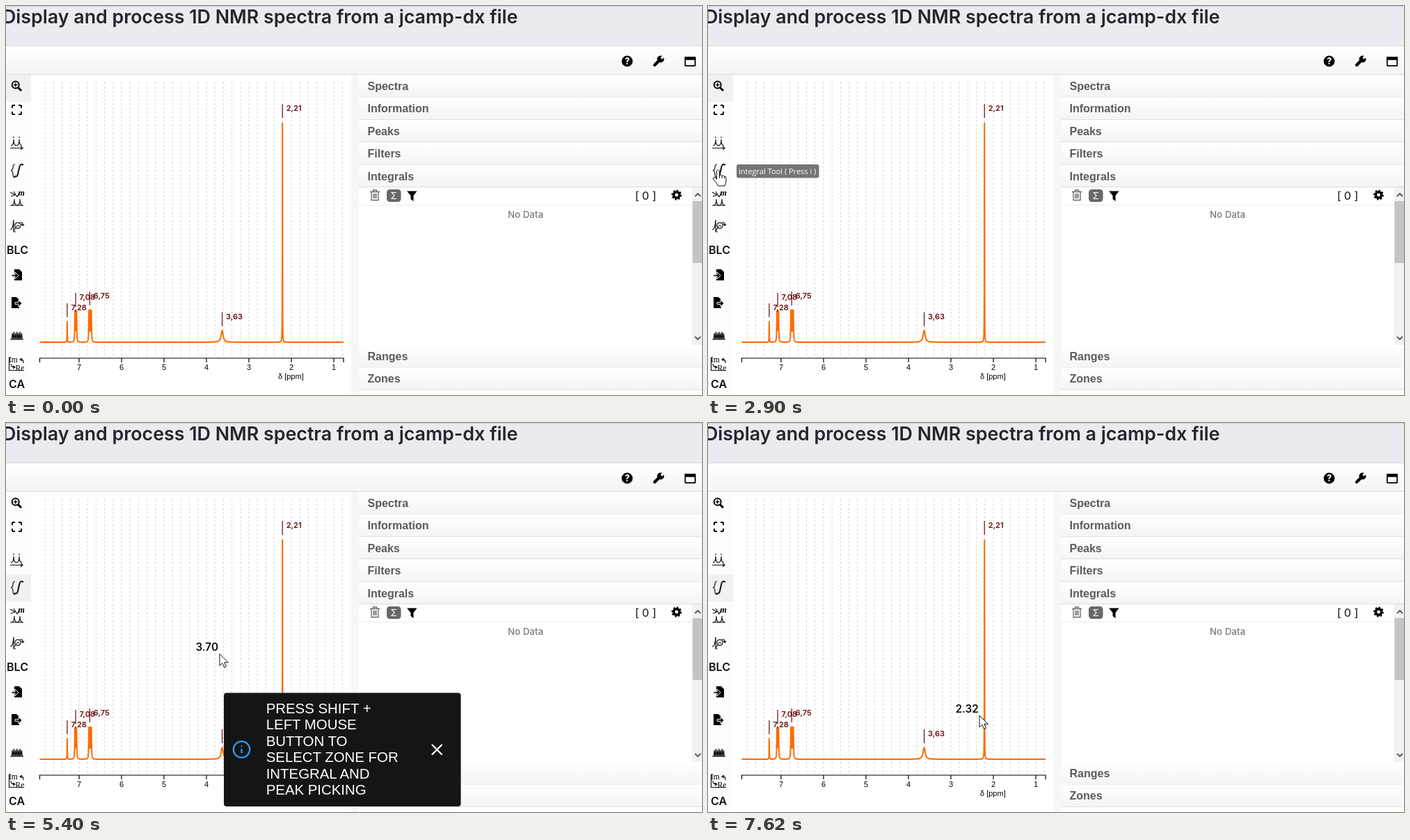
Recreate the animation shown at these times as an HTML page. Size 1000 px wide and 560 px high, loop 8 s.

```html
<!DOCTYPE html>
<html lang="en">
<head>
<meta charset="utf-8">
<title>NMR spectrum viewer</title>
<style>
  html, body { margin: 0; width: 100%; height: 100%; overflow: hidden; background: #fff; }
  svg { display: block; }
  text { font-family: Inter, sans-serif; }
  .arial, .arial text { font-family: "Liberation Sans", Arial, sans-serif; }
  .serif, .serif text { font-family: "Liberation Serif", serif; }
  .line { fill: none; stroke: #111; stroke-width: 1.2; }
  .mid { text-anchor: middle; }
</style>
</head>
<body>
<svg width="1000" height="560" xmlns="http://www.w3.org/2000/svg">
  <defs>
    <linearGradient id="bar" x2="0" y2="1">
      <stop stop-color="#fff"/><stop offset="1" stop-color="#f4f4f4"/>
    </linearGradient>
    <clipPath id="plotClip"><rect x="37" y="99" width="459" height="452"/></clipPath>
    <path id="bumps" d="M0 10q4 0 4-9q0 9 4 9t4-9q0 9 4 9"/>
    <path id="file" d="M0 0H7L11 4V16H0Z"/>
    <path id="into" d="M0-1.300H5V-5L10 0L5 5V1.300H0Z"/>
  </defs>

  <!-- page head -->
  <rect width="1000" height="58" fill="#eaebf0"/>
  <path d="M0 .5H1000" stroke="#d2d3d7"/>
  <text x="-5" y="25" font-size="26.8" font-weight="600" fill="#25252d">Display and process 1D NMR spectra from a jcamp-dx file</text>
  <rect y="58" width="1000" height="41" fill="url(#bar)"/>
  <path d="M0 57.5H1000M0 98.5H1000" stroke="#dcdcdc"/>
  <circle cx="892.5" cy="79.5" r="7.9"/>
  <text class="mid" x="892.5" y="84" font-size="12.5" font-weight="800" fill="#fff">?</text>
  <path d="M932 85L940 77" stroke="#000" stroke-width="4.4" stroke-linecap="round"/>
  <circle cx="940.5" cy="76.5" r="5"/>
  <path d="M941.5 75.5L946 71" stroke="#fbfbfb" stroke-width="3.6"/>
  <rect x="975.8" y="73.8" width="14.4" height="12.4" rx="1" fill="none" stroke="#000" stroke-width="1.7"/>
  <rect x="975" y="73" width="16" height="4.800" rx="1"/>

  <!-- tool column -->
  <rect y="99" width="36.5" height="461" fill="#fdfdfd"/>
  <rect id="active" width="36" height="39" fill="#f1f1f1"/>
  <g fill="none" stroke="#000" stroke-width="2">
    <circle cx="13.7" cy="113.5" r="5"/>
    <path d="M17.5 117.5L22 122" stroke-width="3"/>
    <path d="M11 113.5h5.4M13.7 110.8v5.4" stroke-width="1.4"/>
    <rect x="9" y="143" width="13" height="13" stroke-dasharray="4 5 4 0"/>
  </g>
  <g class="line">
    <use href="#bumps" x="7" y="191"/>
    <path d="M6 204.500H24M21 202l3 2.500-3 2.500M11 188v2M19 188v2"/>
    <path d="M13 228q-3 0-3 4t-3 5q3 0 3 5t3 5"/>
    <path d="M25 229q-5-3-6 4l-2 9q-1 5-5 3" stroke-width="2"/>
    <path d="M6 268l7 4M7 274l6-2M11 267l5 8M16 275l3-6M6 287H25"/>
    <use href="#bumps" x="8" y="277"/>
    <path d="M6 322q4 0 5-14v17h3"/>
    <circle cx="17" cy="316" r="4.200"/>
    <path d="M15 318q2-5 4 0M14 319l-3 5M20 312q4-2 4 4l-2-2m2 2l2-2"/>
    <path d="M20 509q5-2 5 5M23 507l-3 2 3 2M7 515q0 5 5 5M10 518l3 2-3 2M4.500 506v18.500H26"/>
  </g>
  <text class="serif" x="17.500" y="273" font-size="12" font-weight="700" font-style="italic">m</text>
  <g font-size="16" font-weight="600" fill="#111">
    <text x="1" y="357">BLC</text><text x="4" y="549.500">CA</text>
  </g>
  <use href="#file" x="12" y="379"/><use href="#into" x="8" y="388" stroke="#fdfdfd" stroke-width="1"/>
  <use href="#file" x="8" y="419"/><use href="#into" x="13" y="428" stroke="#fdfdfd" stroke-width="1"/>
  <path id="spikes" class="line"/>
  <g class="serif" font-size="11.500"><text x="4" y="513">Im</text><text x="13.500" y="525">Re</text></g>

  <!-- chart -->
  <rect x="37" y="99" width="459" height="452" fill="#fff"/>
  <rect x="496" y="99" width="11" height="461" fill="#f7f7f7"/>
  <path id="grid" stroke="#d6d6d6" stroke-dasharray="3 3"/>
  <path id="curve" fill="none" stroke="#ff6a00" stroke-width="2" stroke-linejoin="round"/>
  <path id="axis" fill="none" stroke="#000" stroke-width="1.200"/>
  <g id="ticks" class="arial mid" font-size="11"></g>
  <text class="arial" x="391" y="537" font-size="11">δ [ppm]</text>
  <g id="peaks" font-size="11" font-weight="600" fill="#650b0b"></g>

  <!-- side panel -->
  <g id="panel" class="arial" font-size="16" font-weight="700" fill="#5b5b5b"></g>
  <rect x="507" y="261" width="493" height="227" fill="#fff"/>
  <path d="M507 286.500H986" stroke="#ececec"/>
  <path d="M523 267.500h14M527.500 267v-2h5v2M525 268v11.500h10V268M528 270v7M530 270v7M532 270v7" fill="none" stroke="#666" stroke-width="1.300"/>
  <rect x="547" y="264" width="20.500" height="18" rx="4.500" fill="#686868"/>
  <text class="mid" x="557.200" y="278" font-size="13.500" fill="#fff">Σ</text>
  <path d="M576 266.500h14.500l-5 6.500v8l-4-3v-5z"/>
  <text class="mid" x="919" y="279" font-size="16" font-weight="500" fill="#333">[ 0 ]</text>
  <g fill="none" stroke="#000">
    <circle cx="963.500" cy="272" r="4.200" stroke-width="3.600"/>
    <circle cx="963.500" cy="272" r="6" stroke-width="2.800" pathLength="16" stroke-dasharray="1"/>
  </g>
  <text class="mid" x="746.500" y="305" font-size="13.300" font-weight="500" fill="#7b7b7b">No Data</text>
  <rect x="986" y="261" width="14" height="227" fill="#f1f1f1"/>
  <rect x="986.500" y="281" width="13.500" height="89" fill="#c4c4c4"/>
  <path d="M990 274l4-4 4 4M990 476l4 4 4-4" fill="none" stroke="#555" stroke-width="1.800"/>

  <!-- overlays -->
  <g id="probe" clip-path="url(#plotClip)">
    <path id="cross" stroke="#111"/>
    <text id="value" font-size="15.300" font-weight="600" fill="#111" text-anchor="end"></text>
  </g>
  <g id="tip">
    <rect x="41" y="228" width="118.500" height="19.500" rx="3" fill="#757575"/>
    <text x="44" y="241.500" font-size="11" fill="#fff" style="font-family:'Open Sans',sans-serif">integral Tool ( Press i )</text>
  </g>
  <g id="toast">
    <rect x="313" y="388.500" width="340.500" height="163.500" rx="4" fill="#151515"/>
    <g id="message" class="arial" font-size="20.400" fill="#fff"></g>
    <g fill="none" stroke="#2e9bf5" stroke-width="2.300" stroke-linecap="round">
      <circle cx="338.500" cy="470" r="11.700"/><path d="M338.500 470v4.700M338.500 465.300v.01"/>
    </g>
    <path d="M612.500 463.500l13.500 13.500M626 463.500l-13.500 13.500" stroke="#fff" stroke-width="2.300" stroke-linecap="round"/>
    <rect id="focus" x="596.500" y="456.500" width="46" height="28" fill="none" stroke="#a5a5a5"/>
  </g>
  <circle id="click" r="13.700" fill="#fe0" fill-opacity=".62"/>
  <g id="mouse" fill="#fff" stroke="#111" stroke-linejoin="round">
    <path id="arrow" d="M0 0V17L4 13.300 6.800 19.500 9.500 18.300 6.800 12.300H12.300Z"/>
    <g id="hand">
      <path d="M-2 1.500Q0-2 2 1.500V8Q4.500 6 5.500 8.500Q8 7 9 9.500Q11.500 9 11.500 11.500V16Q11.500 18 9.500 23H0Q-2 19-7 13Q-7 9-4 11.500L-2 13.500Z"/>
      <path d="M2 8v4M5.500 8.500V12M9 9.500V12.500" fill="none"/>
    </g>
  </g>
</svg>
<script>
const LOOP = 8000, LAG = 0.42;
const $ = id => document.getElementById(id);
const show = (id, on) => { $(id).style.display = on ? '' : 'none'; };
const clamp = v => Math.max(0, Math.min(1, v));
const mix = (a, b, f) => a + (b - a) * f;
const ppmX = ppm => 105 + (7 - ppm) * 61;
const xPpm = x => 7 - (x - 105) / 61;

const linear = f => f;
const easeIn = f => f * f;
const easeOut = f => 1 - (1 - f) ** 3;
const easeInOut = f => f < 0.5 ? 4 * f ** 3 : 1 - 4 * (1 - f) ** 3;

function set(el, attrs) {
  for (const k in attrs) el.setAttribute(k, attrs[k]);
  return el;
}

function add(parent, tag, attrs, text = '') {
  const el = set(document.createElementNS('http://www.w3.org/2000/svg', tag), attrs);
  el.textContent = text;
  $(parent).appendChild(el);
}

const signals = [
  { label: '7,28', top: 454, lines: 1, width: 0.2 },
  { label: '7,08', top: 439, lines: 3, width: 0.4 },
  { label: '6,75', top: 437, lines: 4, width: 0.4 },
  { label: '3,63', top: 467, lines: 1, width: 1.7 },
  { label: '2,21', top: 167, lines: 1, width: 0.15 }
];

function drawChart() {
  let grid = '', axis = 'M48.5 513V507H485V513', spikes = 'M6 480H25';
  for (let i = 0; i <= 35; i++) grid += `M${ppmX(7.8 - i * 0.2)} 110V506`;
  for (let p = 1; p <= 7; p++) {
    axis += `M${ppmX(p)} 507v6`;
    add('ticks', 'text', { x: ppmX(p), y: 524 }, p);
    spikes += `M${6 + p * 2.2} 480l1-${p % 2 ? 9 : 11}l1 ${p % 2 ? 9 : 11}`;
  }
  set($('grid'), { d: grid });
  set($('axis'), { d: axis });
  set($('spikes'), { d: spikes });

  for (const s of signals) {
    s.x = ppmX(+s.label.replace(',', '.'));
    add('peaks', 'path', { d: `M${s.x} ${s.top - 26}v20`, stroke: '#650b0b', 'stroke-width': 1.2 });
    add('peaks', 'text', { x: s.x + 5.5, y: s.top - 15.7 }, s.label);
  }

  const height = x => {
    let h = 0;
    for (const s of signals)
      for (let i = 0; i < s.lines; i++) {
        const c = s.x + (s.lines > 1 ? i * 1.1 - 1 : 0);
        h = Math.max(h, (484 - s.top) / (1 + ((x - c) / s.width) ** 2));
      }
    return h;
  };
  let d = 'M48.5 484';
  for (let x = 48.5; x <= 485; x += 0.1) d += `L${x.toFixed(1)} ${(484 - height(x)).toFixed(1)}`;
  set($('curve'), { d });
}

function drawPanel() {
  const row = (name, y) => {
    add('panel', 'rect', { x: 507, y, width: 493, height: 32.5, fill: 'url(#bar)' });
    add('panel', 'path', { d: `M507 ${Math.floor(y + 32) + 0.5}H1000`, stroke: '#dcdcdc' });
    add('panel', 'text', { x: 519.5, y: y + 22 }, name);
  };
  ['Spectra', 'Information', 'Peaks', 'Filters', 'Integrals'].forEach((n, i) => row(n, 99 + i * 32.45));
  ['Ranges', 'Zones', ''].forEach((n, i) => row(n, 488 + i * 32.4));
  ['PRESS SHIFT +', 'LEFT MOUSE', 'BUTTON TO', 'SELECT ZONE FOR', 'INTEGRAL AND', 'PEAK PICKING']
    .forEach((s, i) => add('message', 'text', { x: 373.7, y: 418 + i * 23.4 }, s));
}

// Each glide starts where the one before ended
const glides = [
  { from: 310, to: 1090, steps: 11, x: 75.3, y: 287, ease: easeOut },
  { from: 1170, to: 1710, steps: 8, x: 14.5, y: 236, ease: easeOut },
  { from: 3210, to: 3670, steps: 7, x: 146, y: 280, ease: linear },
  { from: 3840, to: 3990, steps: 3, x: 236, y: 329, ease: easeIn },
  { from: 4140, to: 4300, steps: 3, x: 306, y: 332, ease: easeOut },
  { from: 5400, to: 6180, steps: 11, x: 619, y: 472, ease: easeInOut },
  { from: 6350, to: 6350, steps: 1, x: 621, y: 470, ease: linear },
  { from: 6900, to: 7620, steps: 10, x: 390, y: 421, ease: easeInOut }
];

// Pointer place now and one step earlier
function pointer(t) {
  let start = { x: 852, y: 587 }, now = start, last = start;
  for (const g of glides) {
    if (t < g.from) break;
    const gap = (g.to - g.from) / (g.steps - 1) || 1;
    const i = Math.min(g.steps, Math.floor((t - g.from) / gap + 0.1) + 1);
    const at = n => {
      const f = g.ease(n / g.steps);
      return { x: mix(start.x, g.x, f), y: mix(start.y, g.y, f) };
    };
    now = at(i);
    last = at(i - 1);
    start = g;
  }
  return [now, last];
}

function render(t) {
  const [{ x, y }, last] = pointer(t);
  const cx = mix(x, last.x, LAG), cy = mix(y, last.y, LAG);
  const integral = t >= 3210;
  const alpha = clamp((t - 3520) / 250) * (1 - clamp((t - 6980) / 240));
  const overToast = alpha > 0 && x > 313 && y > 388;

  set($('active'), { y: integral ? 218 : 99 });
  show('tip', t >= 1560 && !integral);
  set($('toast'), { opacity: alpha });
  show('focus', t >= 6750);

  show('probe', t >= 310 && x > 37 && x < 496 && !overToast);
  show('cross', !integral);
  set($('cross'), { d: `M37 ${Math.round(cy) + 0.5}H496M${Math.round(cx) - 0.5} 99V551` });
  set($('value'), { x: cx - 1.5, y: cy - 4.5 });
  $('value').textContent = xPpm(cx).toFixed(2);

  const onTool = t >= 2110 && t < 2900, onClose = t >= 6750 && t < 6900;
  show('click', onTool || onClose);
  set($('click'), onTool ? { cx: 15, cy: 237 } : { cx: 620, cy: 470.5 });

  const hand = x < 37 || (t >= 6350 && x > 596);
  show('mouse', t >= 310);
  show('hand', hand);
  show('arrow', !hand);
  set($('mouse'), { transform: `translate(${x} ${y})` });
}

drawChart();
drawPanel();
const begin = performance.now();
function frame() {
  render((performance.now() - begin) % LOOP);
  requestAnimationFrame(frame);
}
frame();
</script>
</body>
</html>
```
